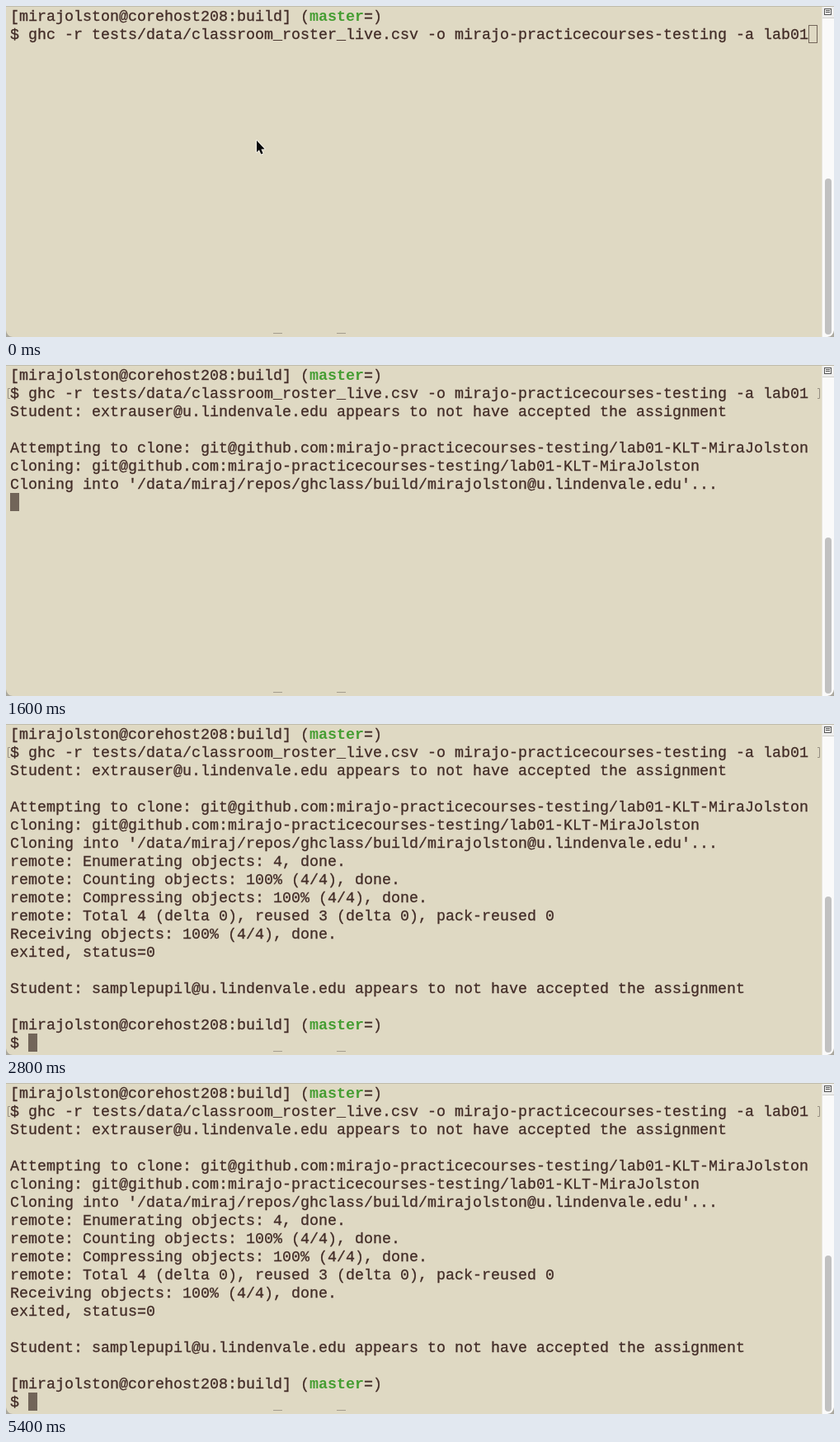
Write an HTML page with a canvas that moves like this. It is 1004 px wide and 401 px high and loops after 5600 ms.

```html
<!DOCTYPE html>
<html lang="en">
<head>
<meta charset="utf-8">
<title>Terminal session</title>
<style>
html, body { margin: 0; width: 100%; height: 100%; overflow: hidden; background: #dfd9c3; }
canvas { display: block; }
</style>
</head>
<body>
<canvas id="stage" width="1004" height="401"></canvas>
<script>
const ctx = document.getElementById('stage').getContext('2d');
const LOOP = 5600, CELL = 11, ROW = 22, LEFT = 5, BASE = 18;
const FONT = '18.33px "Liberation Mono", "Courier New", monospace';
const BG = '#dfd9c3', INK = '#432d28', GREEN = '#459d32', CURSOR = '#726559';

const PROMPT = '[mirajolston@corehost208:build] (';
const ORG = 'mirajo-practicecourses-testing';
const REPO = `git@github.com:${ORG}/lab01-KLT-MiraJolston`;
const MAIL = 'u.lindenvale.edu';
const absent = name => `Student: ${name}@${MAIL} appears to not have accepted the assignment`;

// Blocks of output: time shown, first row, lines
const blocks = [
  [0, 0, [PROMPT, `$ ghc -r tests/data/classroom_roster_live.csv -o ${ORG} -a lab01`]],
  [1600, 2, [
    absent('extrauser'),
    '',
    `Attempting to clone: ${REPO}`,
    `cloning: ${REPO}`,
    `Cloning into '/data/miraj/repos/ghclass/build/mirajolston@${MAIL}'...`
  ]],
  [2600, 7, [
    'remote: Enumerating objects: 4, done.',
    'remote: Counting objects: 100% (4/4), done.',
    'remote: Compressing objects: 100% (4/4), done.',
    'remote: Total 4 (delta 0), reused 3 (delta 0), pack-reused 0',
    'Receiving objects: 100% (4/4), done.'
  ]],
  [2800, 12, ['exited, status=0', '', absent('samplepupil'), '', PROMPT, '$']]
];

// Cursor stops: time, column, row
const stops = [[0, 88, 1], [1600, 0, 7], [2600, 0, 12], [2800, 2, 17]];

function rect(color, x, y, w, h) {
  ctx.fillStyle = color;
  ctx.fillRect(x, y, w, h);
}

function frame(color, x, y, w, h) {
  ctx.strokeStyle = color;
  ctx.lineWidth = 1;
  ctx.strokeRect(x + .5, y + .5, w - 1, h - 1);
}

function path(points) {
  ctx.beginPath();
  points.forEach(([x, y]) => ctx.lineTo(x, y));
}

function write(text, col, row, color = INK, bold = false) {
  const x = LEFT + col * CELL, y = BASE + row * ROW;
  ctx.font = (bold ? 'bold ' : '') + FONT;
  ctx.fillStyle = ctx.strokeStyle = color;
  ctx.fillText(text, x, y);
  if (!bold) {
    ctx.lineWidth = .3;
    ctx.strokeText(text, x, y);
  }
}

function writeLine(text, row) {
  write(text, 0, row);
  if (text === PROMPT) {
    write('master', 33, row, GREEN, true);
    write('=)', 39, row);
  }
}

function drawCursor(t) {
  const [, col, row] = stops.filter(s => s[0] <= t).pop();
  const x = LEFT + col * CELL, y = 1 + row * ROW;
  if (t < 600) frame(CURSOR, x, y, CELL, ROW);
  else rect(CURSOR, x, y, CELL, ROW);
}

function drawMarks() {
  ctx.strokeStyle = '#958d80';
  ctx.lineWidth = 1;
  path([[5, 28.5], [2.5, 28.5], [2.5, 40.5], [5, 40.5]]);
  ctx.stroke();
  path([[984, 28.5], [986.5, 28.5], [986.5, 40.5], [984, 40.5]]);
  ctx.stroke();
}

function drawPointer(x, y) {
  ctx.save();
  ctx.translate(x, y);
  path([[0, 0], [0, 14], [3, 11.2], [5.3, 16.5], [7.6, 15.5], [5.4, 10.4], [9.6, 10.2]]);
  ctx.closePath();
  ctx.lineJoin = 'round';
  ctx.lineWidth = 2;
  ctx.strokeStyle = '#f4f1e8';
  ctx.stroke();
  ctx.fillStyle = '#080808';
  ctx.fill();
  ctx.restore();
}

function drawCorner(x, dir) {
  ctx.beginPath();
  ctx.moveTo(x, 393);
  ctx.quadraticCurveTo(x + dir, 400, x + dir * 8, 401);
  ctx.lineTo(x, 401);
  ctx.fillStyle = '#aaa79d';
  ctx.fill();
}

function drawWindow() {
  rect(BG, 0, 0, 1004, 401);
  rect('#bfbbab', 0, 0, 1004, 1);
  rect('#fafafa', 990, 1, 14, 400);
  rect('#e6e4dc', 989, 1, 1, 400);
  rect('#eeeeed', 990, 1, 14, 13);
  rect('#d2d1cd', 990, 14, 14, 1);
  frame('#555', 992, 3, 9, 8);
  rect('#555', 994, 5, 5, 1);
  rect('#555', 994, 7, 5, 1);
  ctx.beginPath();
  ctx.roundRect(993, 209, 8, 189, 4);
  ctx.fillStyle = '#c1c1c1';
  ctx.fill();
  rect('#a49d8f', 324, 396, 11, 1);
  rect('#a49d8f', 401, 396, 11, 1);
  drawCorner(0, 1);
  drawCorner(1004, -1);
}

function draw(t) {
  drawWindow();
  for (const [start, first, lines] of blocks) {
    if (t >= start) lines.forEach((text, i) => writeLine(text, first + i));
  }
  drawCursor(t);
  if (t >= 1400) drawMarks();
  else drawPointer(304, t < 600 ? 163 : 156);
}

const began = performance.now();
function tick() {
  draw((performance.now() - began) % LOOP);
  requestAnimationFrame(tick);
}
tick();
</script>
</body>
</html>
```
